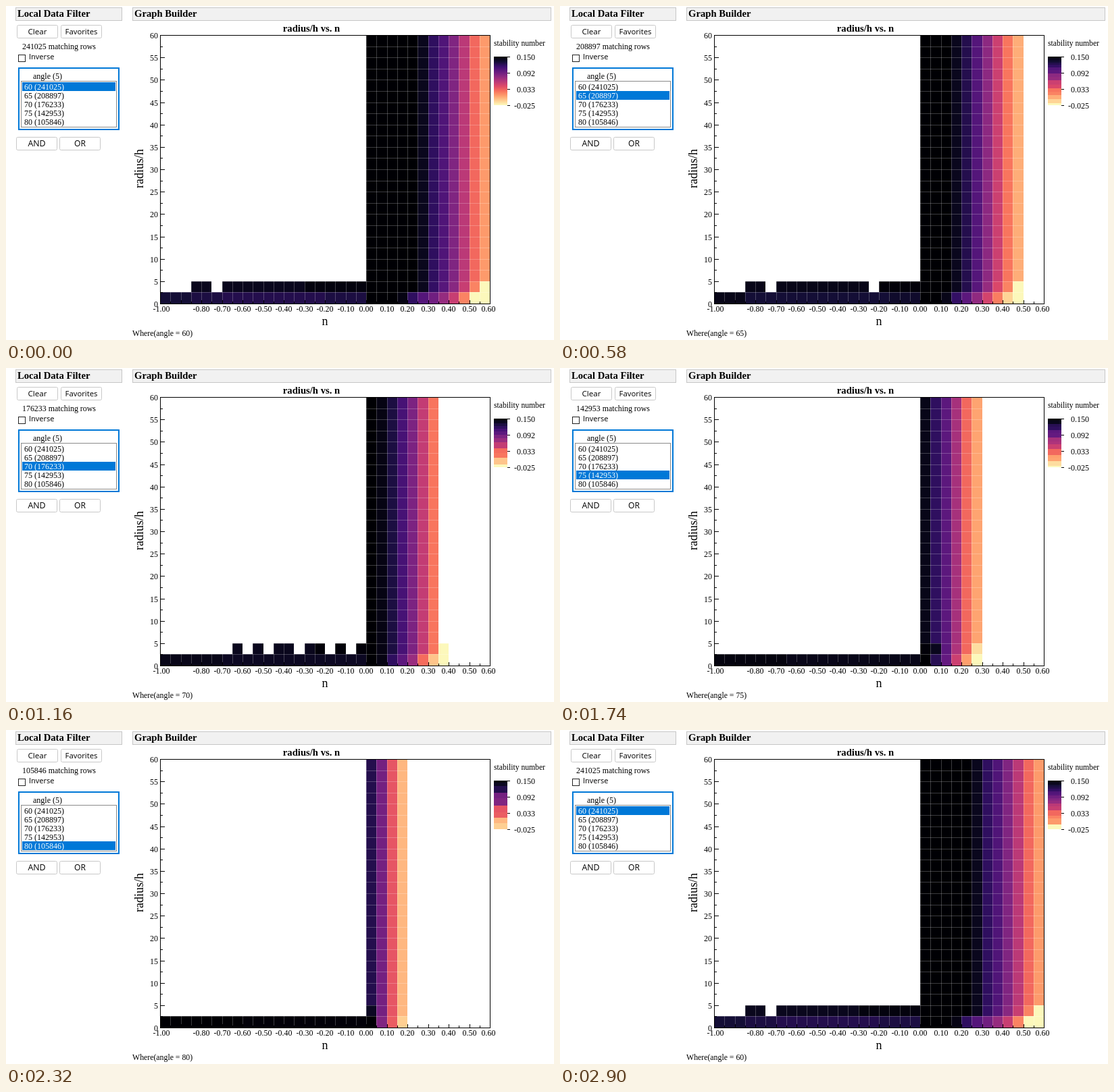
An HTML page that plays this animation: 811 px wide and 495 px high, repeating every 3.48 s.

```html
<!DOCTYPE html>
<html lang="en">
<head>
<meta charset="utf-8">
<title>Graph Builder</title>
<style>
  html, body { margin: 0; width: 100%; height: 100%; overflow: hidden; background: #fff; }
  svg { display: block; width: 811px; height: 495px; }
  text { font: 12px "Liberation Serif", serif; white-space: pre; }
  .title { font-weight: bold; font-size: 14.67px; }
  .ui { font-family: "Open Sans", sans-serif; }
  .axis { font-size: 18px; }
</style>
</head>
<body>
<svg id="stage" viewBox="0 0 811 495" xmlns="http://www.w3.org/2000/svg">
  <g id="panel"></g>
  <g id="cells" shape-rendering="crispEdges"></g>
  <g id="grid" shape-rendering="crispEdges"></g>
  <g id="axes"></g>
  <g id="live"></g>
</svg>
<script>
const STEP = 580, COUNT = 6;
const LEFT = 228, RIGHT = 716, TOP = 43, BOTTOM = 441, COL = 15.25, ZERO = 20;
const MAGMA = ['000004', '140e36', '3b0f70', '641a80', '8c2981', 'b73779',
               'de4968', 'f7705c', 'fe9f6d', 'fecf92', 'fcfdbf']
  .map(h => [0, 2, 4].map(i => parseInt(h.slice(i, i + 2), 16)));

// Colour levels (percent of the scale) per column of n, starting at n = 0.
// main: radius/h above 5; mid: 2.5 to 5 where it differs; low: below 2.5.
// negLow / negMid give the levels for n < 0 (null leaves a gap).
const VIEWS = [
  { angle: 60, rows: 241025,
    main: [0, 0, 0, 0, 0, 5, 17, 25, 37, 51, 68, 79],
    mid: { 6: 18, 7: 27, 8: 39, 9: 54, 10: 74, 11: 99 },
    low: [0, 0, 0, 3, 17, 26, 33, 42, 54, 64, 99, 99], lowFix: { 9: 62, 10: 74 },
    negLow: k => k < 3 ? 10 : k < 6 ? 12 : k < 16 ? 14 : 12,
    negMid: k => k < 3 || k === 5 ? null : k < 14 ? 5 : 2 },
  { angle: 65, rows: 208897,
    main: [0, 0, 0, 5, 14, 26, 40, 55, 71, 83],
    mid: { 5: 27, 6: 42, 7: 59, 8: 74, 9: 99 },
    low: [0, 0, 4, 18, 28, 41, 57, 73, 91, 99],
    negLow: k => k < 3 ? 4 : k < 17 ? 10 : 8,
    negMid: k => k < 3 || k === 5 || k === 15 ? null : k < 15 ? 4 : 1 },
  { angle: 70, rows: 176233,
    main: [0, 3, 12, 23, 36, 53, 71],
    mid: { 7: 99 },
    low: [0, 3, 17, 28, 43, 69, 88, 99],
    negLow: k => k < 6 ? 4 : 6,
    negMid: k => [7, 9, 11, 12, 14, 15, 17, 19].includes(k) ? (k < 15 ? 5 : 1) : null },
  { angle: 75, rows: 142953,
    main: [4, 17, 28, 46, 68, 81],
    mid: { 0: 1, 1: 5, 3: 48, 5: 93 },
    low: [0, 15, 30, 55, 80, 99],
    negLow: k => k < 7 ? 2 : 4,
    negMid: () => null },
  { angle: 80, rows: 105846,
    main: [14, 34, 63, 85],
    mid: { 0: 6 },
    low: [0, 37, 65, 90],
    negLow: k => k < 8 ? 0 : 1,
    negMid: () => null }
];
// Keep the last dark-orange cells in the low row of the first view.
Object.entries(VIEWS[0].lowFix).forEach(([i, v]) => { if (i < 10) VIEWS[0].low[i] = 74; });

const $ = id => document.getElementById(id);
const xAt = k => Math.round(LEFT + k * COL);
const yAt = r => Math.round(BOTTOM - r * (BOTTOM - TOP) / 60);

function magma(t) {
  const p = Math.min(Math.max(t, 0), 0.9999) * 10, i = Math.floor(p);
  return `rgb(${MAGMA[i].map((c, j) => Math.round(c + (MAGMA[i + 1][j] - c) * (p - i)))})`;
}
const rect = (x, y, w, h, fill, more = '') =>
  `<rect x="${x}" y="${y}" width="${w}" height="${h}" fill="${fill}" ${more}/>`;
const line = (x1, y1, x2, y2, color = '#000') =>
  `<path d="M${x1} ${y1}L${x2} ${y2}" stroke="${color}"/>`;
const text = (x, y, s, more = '') => `<text x="${x}" y="${y}" ${more}>${s}</text>`;
const MID = 'text-anchor="middle"', END = 'text-anchor="end"';

function drawPanel() {
  const header = (x, w, s) =>
    rect(x + .5, 2.5, w, 19, '#f1f1f1', 'stroke="#c6c6c6"') + text(x + 3, 16, s, 'class="title"');
  const button = (x, y, s, size) =>
    rect(x + .5, y + .5, 60, 19, '#fff', 'rx="2" stroke="#c8c8c8"') +
    text(x + 30.5, y + 14, s, `class="ui" ${MID} style="font-size:${size}px"`);
  $('panel').innerHTML =
    header(14, 157, 'Local Data Filter') + header(187, 619, 'Graph Builder') +
    button(16, 28, 'Clear', 11.6) + button(81, 28, 'Favorites', 11.3) +
    button(15, 194, 'AND', 12.4) + button(79, 194, 'OR', 12) +
    rect(18.5, 72.5, 10, 10, '#fff', 'stroke="#222"') +
    text(34, 79, 'Inverse', 'class="ui" style="font-size:11px"') +
    rect(19, 92, 148, 91, '#fff', 'stroke="#0078d7" stroke-width="2"') +
    text(40, 108, 'angle (5)') +
    rect(22.5, 111.5, 141, 68, '#fff', 'stroke="#8a8a8a"');
}

function drawAxes() {
  let grid = '', s = rect(LEFT + .5, TOP + .5, RIGHT - LEFT, BOTTOM - TOP, 'none', 'stroke="#000"');
  const veil = 'rgba(255,255,255,.23)';
  for (let k = 1; k < 32; k++) grid += rect(xAt(k), TOP, 1, BOTTOM - TOP, veil);
  for (let r = 1; r < 24; r++) grid += rect(LEFT, yAt(r * 2.5), RIGHT - LEFT, 1, veil);
  $('grid').innerHTML = grid;

  for (let i = 0; i <= 24; i++) {
    const y = yAt(i * 2.5) + .5, major = i % 2 === 0;
    s += line(LEFT, y, LEFT + (major ? 7 : 4), y);
    if (major) s += text(225, y + 4, i * 2.5, END);
  }
  for (let k = 0; k <= 32; k++) {
    const x = xAt(k) + .5, major = k % 2 === 0;
    s += line(x, BOTTOM, x, BOTTOM - (major ? 5 : 3));
    if (major && k !== 2) {
      const shift = k === 0 ? 2 : k === 32 ? -2 : 0;
      s += text(x + shift - .5, 453, ((k - ZERO) / 20).toFixed(2), MID);
    }
  }
  s += text(452, 38, 'radius/h vs. n', `class="title" ${MID}`) +
    text(472, 473, 'n', `class="axis" ${MID}`) +
    text(0, 0, 'radius/h', `class="axis" ${MID} transform="translate(203 241) rotate(-90)"`) +
    text(722, 59, 'stability number', 'style="font-size:11.65px"');
  ['0.150', '0.092', '0.033', '-0.025'].forEach((v, i) => {
    const y = 75.5 + i * 24;
    s += line(742, y, 746, y) + text(783, y + 4, v, END);
  });
  $('axes').innerHTML = s;
}

function drawView(index) {
  const v = VIEWS[index % VIEWS.length], used = new Set();
  let cells = '', live = '';
  const cell = (k, r0, r1, level) => {
    if (level == null) return;
    used.add(level);
    cells += rect(xAt(k), yAt(r1), xAt(k + 1) - xAt(k), yAt(r0) - yAt(r1), magma(level / 100));
  };
  for (let k = 0; k < 32; k++) {
    const i = k - ZERO;
    if (i < 0) {
      cell(k, 0, 2.5, v.negLow(k));
      cell(k, 2.5, 5, v.negMid(k));
    } else {
      cell(k, 0, 2.5, v.low[i]);
      cell(k, 2.5, 5, v.mid[i] ?? v.main[i]);
      cell(k, 5, 60, v.main[i]);
    }
  }
  // The colour bar shows the levels in use, each up to halfway to the next.
  const levels = [...used];
  for (let y = 0; y < 72; y++) {
    const p = y / 0.72;
    const level = index === 0 ? p
      : levels.reduce((a, b) => Math.abs(b - p) < Math.abs(a - p) ? b : a);
    cells += rect(722, 75 + y, 20, 1, magma(level / 100));
  }
  VIEWS.forEach((o, i) => {
    const on = o === v;
    if (on) live += rect(24, 113 + 13 * i, 138, 13, '#0078d7');
    live += text(27, 124 + 13 * i, `${o.angle} (${o.rows})`, on ? 'fill="#fff"' : '');
  });
  live += text(24, 64, `${v.rows} matching rows`, 'style="font-size:11.9px"') +
    text(187, 489, `Where(angle = ${v.angle})`, 'style="font-size:11.8px"');
  $('cells').innerHTML = cells;
  $('live').innerHTML = live;
}

let shown = -1;
function tick() {
  const index = Math.floor(performance.now() / STEP) % COUNT;
  if (index !== shown) drawView(shown = index);
  requestAnimationFrame(tick);
}
drawPanel();
drawAxes();
tick();
</script>
</body>
</html>
```
